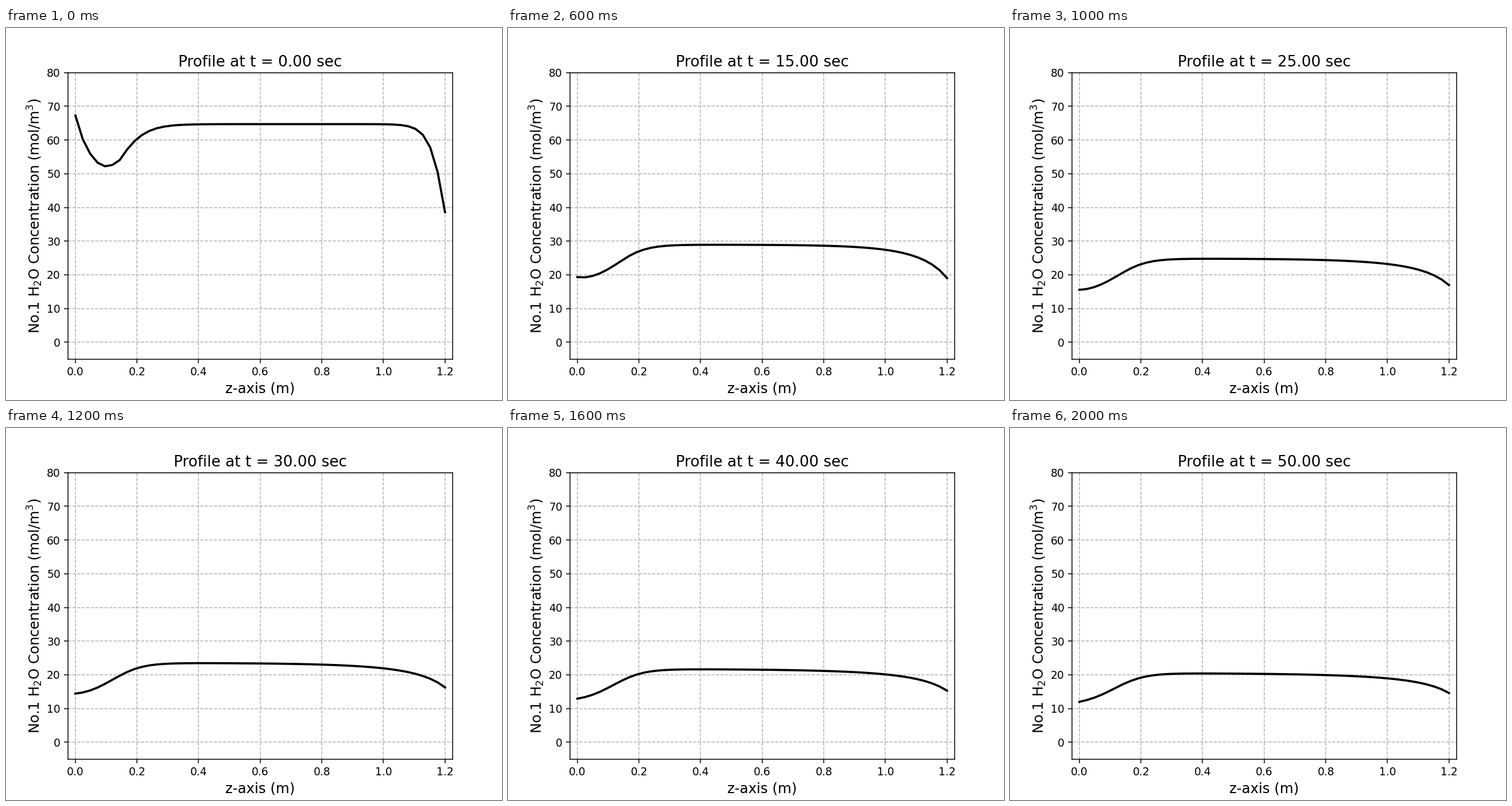
A matplotlib script for the animation above (2.1 s loop, 864 px wide and 648 px high).

```python
import numpy as np
import matplotlib.pyplot as plt
from matplotlib.animation import FuncAnimation

plt.rcParams["font.family"] = "DejaVu Sans"

STEPS = 21
DT = 2.5
LENGTH = 1.2
z = np.linspace(0, LENGTH, 51)

# Inlet zone: a soft step in z, refilled by the feed close to the inlet
EDGE, STEEP = 0.125, 18.33
step_shape = ((1 + np.exp(-STEEP * EDGE)) / (1 + np.exp(STEEP * (z - EDGE)))) ** 1.24
feed_shape = 1 - np.clip(z / 0.144, 0, 1) ** 0.8


def evolve(t, start, a, b, power):
    """Power law in time with a slowly fading rate."""
    return start * (1 + a * t - b * t * t) ** power


def concentration(t):
    plateau = evolve(t, 64.72, 0.5593, 0.002715, -1 / 2.7)
    inlet = evolve(t, 67.3, 0.705, 0.00393, -1 / 1.9)
    outlet = evolve(t, 38.6, 0.965, 0.0037, -1 / 3.8)

    # Logistic front that widens as the outlet drains
    rate = evolve(t, 34.9, 0.52, 0.0022, -1 / 1.4)
    sharp = evolve(t, 0.64, 0.33, 0.0018, 1 / 2)
    front = (plateau - outlet) / (1 + sharp * np.expm1(rate * (LENGTH - z)))

    depth = plateau * (0.436 - 1e-5 * t * t)
    feed = depth - (plateau - inlet)
    return plateau - front - step_shape * (depth - feed * feed_shape)


fig, ax = plt.subplots(figsize=(6.4, 4.8), dpi=135)
fig.subplots_adjust(left=0.125, right=0.9, bottom=0.11, top=0.88)
line, = ax.plot(z, concentration(0), "k", lw=2)
ax.set_xlim(-0.024, 1.224)
ax.set_ylim(-5, 80)
ax.set_xticks(np.arange(0, 1.3, 0.2))
ax.set_yticks(range(0, 81, 10))
ax.grid(linestyle="--")
ax.set_xlabel("z-axis (m)", fontsize=13)
ax.set_ylabel("No.1 H$_2$O Concentration (mol/m$^3$)", fontsize=13, labelpad=2.5)
title = ax.set_title("", fontsize=14)


def update(step):
    t = step * DT
    line.set_ydata(concentration(t))
    title.set_text(f"Profile at t = {t:.2f} sec")
    return line, title


anim = FuncAnimation(fig, update, frames=STEPS, interval=100, repeat=True)
plt.show()
```
